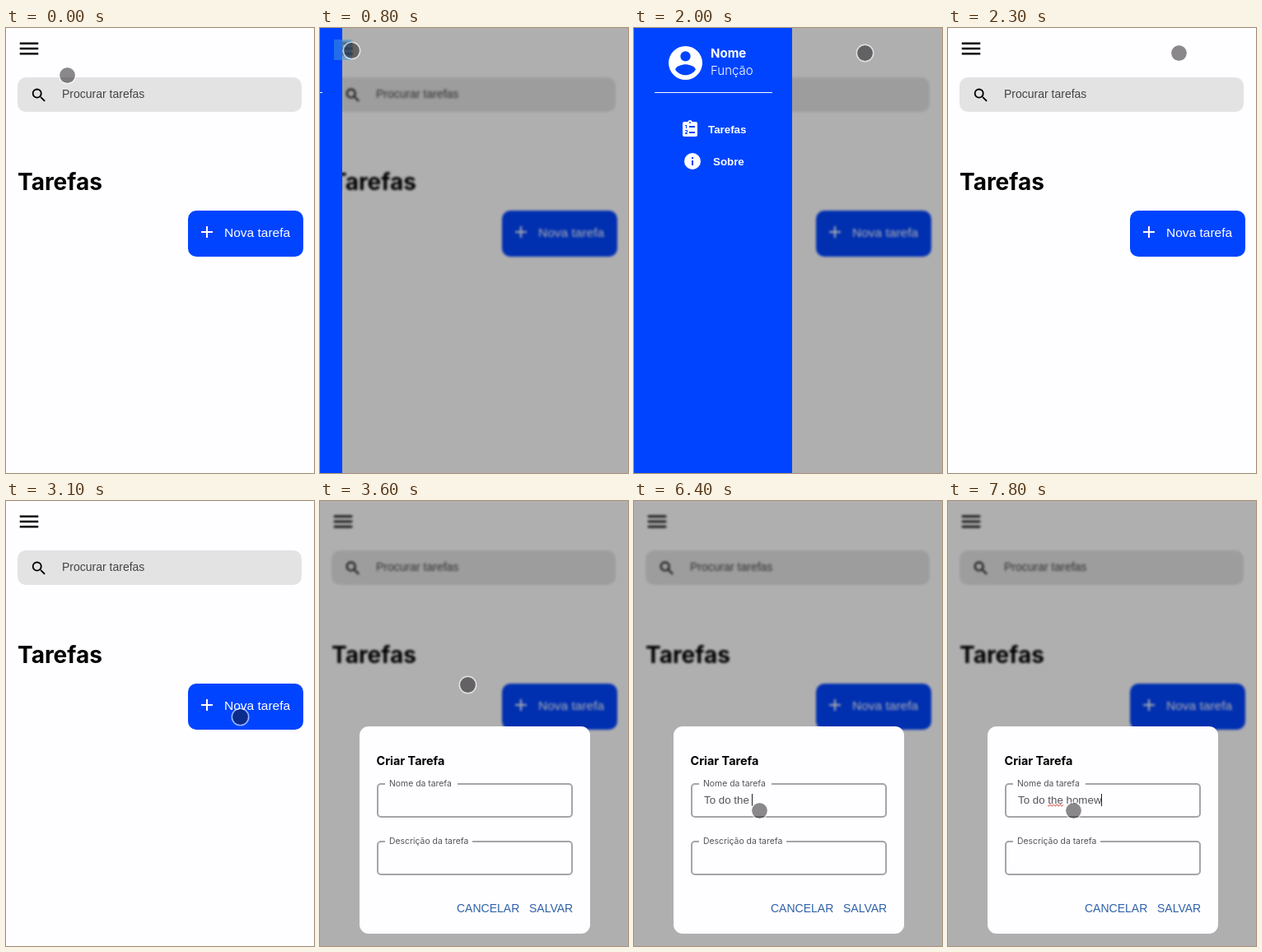
An HTML page with a canvas for the animation above (8 s loop, 374 px wide and 541 px high).

```html
<!DOCTYPE html>
<html lang="pt">
<head>
<meta charset="utf-8">
<title>Tarefas</title>
<style>
html, body { margin: 0; width: 100%; height: 100%; overflow: hidden; background: #fefdff; }
canvas { display: block; width: 374px; height: 541px; }
</style>
</head>
<body>
<canvas id="stage" width="374" height="541"></canvas>
<script>
const W = 374, H = 541, LOOP = 8000, STEP = 100;
const WHITE = '#fefdff', BLUE = '#0044ff';
const SANS = '"Liberation Sans", Arial, sans-serif';
const GEO = 'Inter, "Open Sans", sans-serif';
const stage = document.getElementById('stage').getContext('2d');

// Each entry holds until the next one: time, x, y
const POINTER = [
  [0, 74, 57], [100, 56, 43], [300, 46, 34], [500, 40, 29], [600, 38, 27],
  [1800, 92, 28], [1900, 224, 31], [2000, 280, 30],
  [2700, 232, 62], [2800, 186, 142], [2900, 245, 222], [3100, 284, 262],
  [3400, 262, 251], [3500, 215, 232], [3600, 179, 223],
  [3800, 172, 268], [3900, 157, 335], [4000, 142, 384], [4100, 144, 395], [4300, 152, 376]
];
const TYPED = [
  [4600, ''], [4800, 'T'], [5200, 'To'], [5500, 'To d'], [5800, 'To do '],
  [5900, 'To do t'], [6100, 'To do th'], [6300, 'To do the'], [6400, 'To do the '],
  [6800, 'To do the hi'], [7000, 'To do the '], [7400, 'To do the h'],
  [7600, 'To do the hom'], [7800, 'To do the homew']
];

const ICONS = {
  menu: 'M3 6h18v2H3zM3 11h18v2H3zM3 16h18v2H3z',
  search: 'M15.5 14h-.79l-.28-.27A6.47 6.47 0 0 0 16 9.5 6.5 6.5 0 1 0 9.5 16c1.61 0 3.09-.59 4.23-1.57l.27.28v.79l5 4.99L20.49 19zM9.5 14a4.5 4.5 0 1 1 0-9 4.5 4.5 0 0 1 0 9z',
  user: 'M12 2a10 10 0 1 0 0 20 10 10 0 0 0 0-20zM12 5a3 3 0 1 1 0 6 3 3 0 0 1 0-6zM12 19.2c-2.5 0-4.71-1.28-6-3.2.03-2 4-3.1 6-3.1s5.97 1.1 6 3.1c-1.29 1.92-3.5 3.2-6 3.2z',
  info: 'M12 2a10 10 0 1 0 0 20 10 10 0 0 0 0-20zM11 7h2v2h-2zM11 11h2v6h-2z',
  list: 'M5 3h4.2a3 3 0 0 1 5.6 0H19a2 2 0 0 1 2 2v14a2 2 0 0 1-2 2H5a2 2 0 0 1-2-2V5a2 2 0 0 1 2-2zM12 3a1 1 0 1 0 0 2 1 1 0 0 0 0-2zM6 7h2v4H7V8H6zM11 8h7v2h-7zM6 13h3v2.5l-1.6 1.5H9v1H6v-1.2l2-1.9V14H6zM11 15h7v2h-7z'
};

function held(rows, t) {
  let hit = null;
  for (const row of rows) if (row[0] <= t) hit = row;
  return hit;
}

// cubic-bezier(0, 0, .2, 1)
function easeOut(p) {
  if (p <= 0) return 0;
  if (p >= 1) return 1;
  let lo = 0, hi = 1;
  for (let i = 0; i < 24; i++) {
    const u = (lo + hi) / 2;
    if (0.6 * u * u + 0.4 * u * u * u < p) lo = u; else hi = u;
  }
  return 3 * lo * lo - 2 * lo * lo * lo;
}

function box(c, x, y, w, h, r, color) {
  c.beginPath();
  c.roundRect(x, y, w, h, r);
  c.fillStyle = color;
  c.fill();
}

function text(c, str, x, y, font, color) {
  c.font = font;
  c.fillStyle = color;
  c.fillText(str, x, y);
}

function icon(c, name, x, y, size, color) {
  c.save();
  c.translate(x, y);
  c.scale(size / 24, size / 24);
  c.fillStyle = color;
  c.fill(new Path2D(ICONS[name]), 'evenodd');
  c.restore();
}

function layer(draw) {
  const el = document.createElement('canvas');
  el.width = W;
  el.height = H;
  draw(el.getContext('2d'));
  return el;
}

const page = layer(c => {
  c.fillStyle = WHITE;
  c.fillRect(0, 0, W, H);
  icon(c, 'menu', 13, 10, 30, '#000');
  box(c, 14, 60, 345, 42, 10, '#e3e3e4');
  icon(c, 'search', 29, 70.8, 22, '#000');
  text(c, 'Procurar tarefas', 68, 85, '14px ' + SANS, '#444');
  text(c, 'Tarefas', 14, 197, '700 28px ' + GEO, '#000');
  box(c, 221, 222, 140, 56, 10, BLUE);
  c.fillStyle = '#fff';
  c.fillRect(237, 247, 14, 2);
  c.fillRect(243, 241, 2, 14);
  text(c, 'Nova tarefa', 265, 254, '15.5px ' + SANS, '#fff');
});

const dimmed = layer(c => {
  c.drawImage(page, 0, 0);
  c.filter = 'blur(1.7px)';
  c.drawImage(page, 0, 0);
  c.filter = 'none';
  // repaint without the sharp copy under the soft edges
  const soft = layer(s => {
    s.fillStyle = WHITE;
    s.fillRect(0, 0, W, H);
    s.filter = 'blur(1.7px)';
    s.drawImage(page, 0, 0);
  });
  c.drawImage(soft, 0, 0);
  c.fillStyle = 'rgba(0,0,0,.31)';
  c.fillRect(0, 0, W, H);
});

function drawer(c, width) {
  c.save();
  c.translate(Math.round(width) - 192, 0);
  c.fillStyle = BLUE;
  c.fillRect(0, 0, 192, H);
  icon(c, 'user', 37.9, 17.9, 49.2, '#fff');
  text(c, 'Nome', 93, 36, '700 15px ' + GEO, '#fff');
  text(c, 'Função', 93, 57, '300 15px ' + GEO, '#fff');
  c.fillStyle = '#fff';
  c.fillRect(25, 78, 143, 1);
  icon(c, 'list', 56, 111, 24, '#fff');
  text(c, 'Tarefas', 90, 128, '700 13.33px ' + SANS, '#fff');
  icon(c, 'info', 59, 150, 24, '#fff');
  text(c, 'Sobre', 96, 167, '700 13.33px ' + SANS, '#fff');
  c.restore();
}

function field(c, y, label, gap) {
  c.beginPath();
  c.roundRect(70, y + 1, 236, 40, 4);
  c.strokeStyle = '#a5a4a8';
  c.lineWidth = 2;
  c.stroke();
  c.fillStyle = WHITE;
  c.fillRect(79, y - 1, gap, 4);
  text(c, label, 84, y + 4, '10.4px ' + GEO, '#555359');
}

function squiggle(c, x0, x1, y) {
  c.beginPath();
  for (let x = x0; x <= x1; x += 0.5) c.lineTo(x, y + Math.sin((x - x0) * Math.PI / 2));
  c.strokeStyle = '#e0342c';
  c.lineWidth = 1;
  c.stroke();
}

function entry(c, t) {
  const row = held(TYPED, t);
  if (!row) return;
  text(c, row[1], 85, 368, '13.33px ' + SANS, '#555359');
  const at = s => 85 + c.measureText(s).width;
  if (t >= 6800) squiggle(c, at('To do '), at('To do the'), 370);
  c.fillStyle = '#222';
  c.fillRect(Math.floor(at(row[1])), 356, 1, 15);
}

function dialog(c, t) {
  c.save();
  c.globalAlpha = Math.min(1, (t - 3200) / 200);
  box(c, 48, 274, 280, 252, 11, WHITE);
  text(c, 'Criar Tarefa', 68.5, 321, '700 14.4px ' + GEO, '#000');
  field(c, 343, 'Nome da tarefa', 88);
  field(c, 413, 'Descrição da tarefa', 106);
  text(c, 'CANCELAR', 166, 500, '14px ' + SANS, '#2f62a8');
  text(c, 'SALVAR', 254, 500, '14px ' + SANS, '#2f62a8');
  entry(c, t);
  c.restore();
}

function pointer(c, t) {
  const [, x, y] = held(POINTER, t);
  c.beginPath();
  c.arc(x + 0.5, y + 0.5, 9.5, 0, Math.PI * 2);
  c.fillStyle = 'rgba(22,20,24,.5)';
  c.fill();
  c.beginPath();
  c.arc(x + 0.5, y + 0.5, 10.2, 0, Math.PI * 2);
  c.strokeStyle = 'rgba(255,255,255,.6)';
  c.lineWidth = 1.6;
  c.stroke();
}

function render(t) {
  const c = stage;
  const menuOpen = t >= 800 && t < 2300;
  const dialogOpen = t >= 3300;
  c.drawImage(menuOpen || dialogOpen ? dimmed : page, 0, 0);
  if (menuOpen) {
    drawer(c, 192 * easeOut((t - 769) / 787));
    if (t < 900) {
      c.fillStyle = 'rgba(70,150,215,.5)';
      c.fillRect(17, 14, 21, 25);
    }
  }
  if (dialogOpen) dialog(c, t);
  pointer(c, t);
}

const start = performance.now();
function tick() {
  const t = (performance.now() - start) % LOOP;
  render(Math.floor(t / STEP) * STEP);
  requestAnimationFrame(tick);
}
tick();
</script>
</body>
</html>
```
